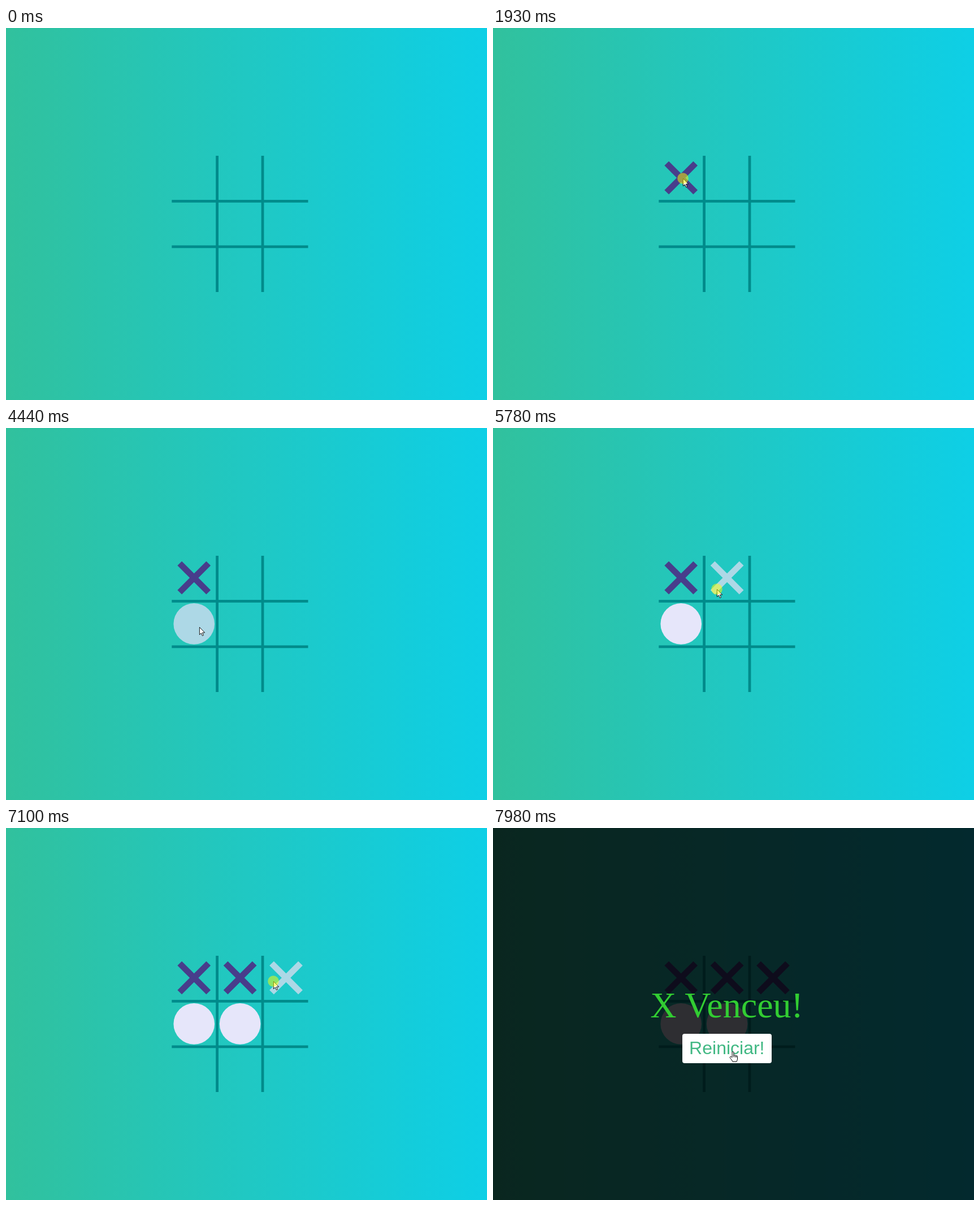
An HTML page for the animation above (8 s loop, 851 by 658 pixels).

```html
<!DOCTYPE html>
<html lang="pt">
<head>
<meta charset="utf-8">
<title>Jogo da velha</title>
<style>
  html, body { margin: 0; width: 100%; height: 100%; overflow: hidden; }
  svg { display: block; width: 100vw; height: 100vh; }
  .title { font: 64px "Liberation Serif", "Times New Roman", serif; fill: #32cd32; }
  .label { font: 32px "Liberation Sans", Arial, sans-serif; }
</style>
</head>
<body>
<svg viewBox="0 0 851 658">
  <defs>
    <linearGradient id="sky">
      <stop offset="0" stop-color="#31c19d"/>
      <stop offset=".5" stop-color="#20c8c3"/>
      <stop offset="1" stop-color="#0ecfe6"/>
    </linearGradient>
  </defs>
  <rect width="851" height="658" fill="url(#sky)"/>
  <path d="M373.6 226V467M454 226V467M293.3 306.4H534.5M293.3 386.8H534.5" stroke="#008b8b" stroke-width="4.8"/>
  <g id="marks"></g>
  <g id="end">
    <rect width="851" height="658" fill="#000" fill-opacity=".8"/>
    <text class="title" x="413.5" y="335" text-anchor="middle">X Venceu!</text>
    <rect id="button" x="335" y="364" width="158" height="52" rx="4"/>
    <text id="label" class="label" x="413.8" y="400" text-anchor="middle">Reiniciar!</text>
  </g>
  <g id="pointer" stroke="#000" stroke-linejoin="round" fill="#fff">
    <path id="arrow" stroke-width=".9" d="M.4 .4V13.6L3.4 10.8L5.4 15.5L7.5 14.6L5.5 10H9.7Z"/>
    <path id="hand" d="M-1.4 9.5V.9Q-1.4-.4 0-.4T1.4 .9V6Q2.8 4.9 3.9 6.4Q5.3 5.5 6.2 6.9Q8 6.4 8 8.5V12Q8 14.5 6.5 17.2H-.5Q-2.2 13.8-5 10.7Q-6 9-4.6 8.4Q-3.2 8-1.4 10.2M1.4 6V9.4M3.9 6.6V9.6M6.2 7.2V9.8"/>
    <circle id="click" r="9.8" stroke="none" fill="#ff0" fill-opacity=".5"/>
  </g>
</svg>
<script>
const LOOP = 8000;
const STEP = 70;
const $ = id => document.getElementById(id);
const show = (el, on) => el.setAttribute('display', on ? 'inline' : 'none');

const board = { x: 293.3, y: 226.2, cell: 80.4 };
const kinds = [
  { tag: 'path', d: 'M-25.5-25.5L25.5 25.5M25.5-25.5L-25.5 25.5', 'stroke-width': 10.9, paint: 'stroke', solid: '#483d8b' },
  { tag: 'circle', r: 36.3, paint: 'fill', solid: '#e6e6fa' }
];

// Pointer moves: start, end, destination
const moves = [
  [120, 250, 724, 557],
  [640, 850, 396, 438],
  [1050, 1120, 346, 369],
  [1190, 1540, 336, 266],
  [2390, 3020, 344, 406],
  [4100, 4310, 342, 352],
  [4630, 4840, 377, 299],
  [4910, 5050, 396, 285],
  [5920, 6270, 409, 346],
  [6620, 7030, 473, 271],
  [7570, 7780, 497, 350],
  [7840, 7980, 424.5, 396]
];
const clicks = [1800, 4450, 5780, 6410, 7100];

function pointerAt(t) {
  let pos = [790, 665];
  for (const [from, to, ...dest] of moves) {
    if (t < from) break;
    const gaps = Math.round((to - from) / STEP);
    const step = Math.min(gaps, Math.floor((t - from) / (to - from) * gaps + 0.01));
    const p = 1 - (1 - (step + 1) / (gaps + 1)) ** 1.5;
    pos = pos.map((v, i) => v + (dest[i] - v) * p);
  }
  return pos;
}

// Cell index under the pointer, or -1
function cellAt(t) {
  const [x, y] = pointerAt(t);
  const col = Math.floor((x - board.x) / board.cell);
  const row = Math.floor((y - board.y) / board.cell);
  const inside = Math.min(col, row) >= 0 && Math.max(col, row) < 3;
  return inside ? row * 3 + col : -1;
}

const turns = clicks.map(time => ({ time, cell: cellAt(time) }));

const cells = Array.from({ length: 9 }, (_, i) => kinds.map(({ tag, paint, solid, ...attrs }) => {
  const el = document.createElementNS('http://www.w3.org/2000/svg', tag);
  const x = 332.7 + i % 3 * 81.4;
  const y = 265 + Math.floor(i / 3) * 81.4;
  attrs.transform = `translate(${x} ${y})`;
  for (const name in attrs) el.setAttribute(name, attrs[name]);
  $('marks').append(el);
  return el;
}));

function render(t) {
  const played = turns.filter(turn => t >= turn.time + STEP).map(turn => turn.cell);
  const won = played.length === turns.length;
  const hovered = won ? -1 : cellAt(t - STEP);

  cells.forEach((pair, cell) => {
    const turn = played.indexOf(cell);
    const placed = turn >= 0;
    const current = (placed ? turn : played.length) % 2;
    pair.forEach((el, k) => {
      show(el, k === current && (placed || cell === hovered));
      el.setAttribute(kinds[k].paint, placed ? kinds[k].solid : '#add8e6');
    });
  });

  const [x, y] = pointerAt(t);
  const over = won && x > 335 && x < 493 && y > 364 && y < 416;
  show($('end'), won);
  $('button').setAttribute('fill', over ? '#fff' : '#41b883');
  $('label').setAttribute('fill', over ? '#41b883' : '#fff');

  $('pointer').setAttribute('transform', `translate(${x} ${y})`);
  show($('arrow'), !over);
  show($('hand'), over);
  show($('click'), clicks.some(time => t >= time && t < time + 2 * STEP));
}

const start = performance.now();
function tick() {
  render((performance.now() - start) % LOOP);
  requestAnimationFrame(tick);
}
tick();
</script>
</body>
</html>
```
